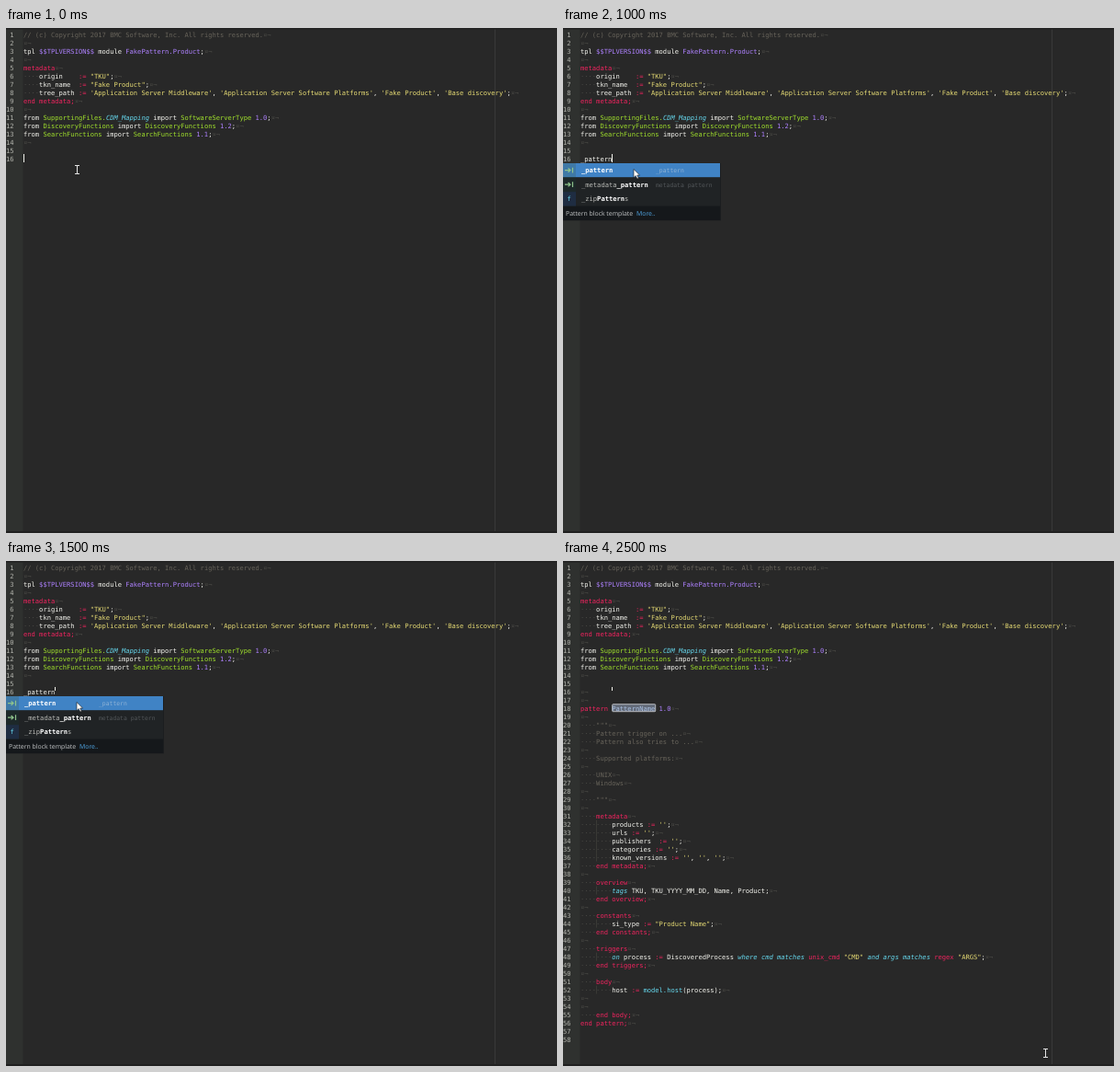
An HTML page that plays this animation: 600x549 px, repeating every 3 s.

```html
<!DOCTYPE html>
<html lang="en">
<head>
<meta charset="utf-8">
<title>Editor snippets</title>
<style>
html, body { margin: 0; width: 100%; height: 100%; overflow: hidden; background: #282828; }
svg { display: block; }
text { font: 7.11px "DejaVu Sans Mono", monospace; white-space: pre; text-rendering: geometricPrecision; fill: #f4f4ee; }
.note { fill: #67635a; }
.str { fill: #e6db74; }
.num { fill: #ae81ff; }
.key { fill: #f0245f; }
.fn { fill: #66d9ef; font-style: italic; }
.call { fill: #66d9ef; }
.lib { fill: #a0e02c; }
.space { fill: #4b4a46; }
.line { fill: #b4b5ae; }
.pick { fill: #a9bfe0; }
.item { fill: #b9bab6; }
.hit { fill: #fff; font-weight: bold; }
.hint { fill: #53575a; font-size: 6.4px; }
.on { fill: #8fb3d6; font-size: 6.4px; }
.info, .more { font: 6.9px "Open Sans", "Noto Sans", sans-serif; fill: #c3c5c6; }
.more { fill: #4fa3e0; }
</style>
</head>
<body>
<svg id="stage" width="600" height="549" viewBox="0 0 600 549"></svg>
<script>
const LEFT = 19, CHAR = 4.28, LINE = 9, ROW = 15.57, POP_TOP = 147, LOOP = 3000;
const stage = document.getElementById('stage');

const header = `// (c) Copyright 2017 BMC Software, Inc. All rights reserved.

tpl $$TPLVERSION$$ module FakePattern.Product;

metadata
    origin    := "TKU";
    tkn_name  := "Fake Product";
    tree_path := 'Application Server Middleware', 'Application Server Software Platforms', 'Fake Product', 'Base discovery';
end metadata;

from SupportingFiles.CDM_Mapping import SoftwareServerType 1.0;
from DiscoveryFunctions import DiscoveryFunctions 1.2;
from SearchFunctions import SearchFunctions 1.1;

`;

const template = `

pattern PatternName 1.0

    """
    Pattern trigger on ...
    Pattern also tries to ...

    Supported platforms:

    UNIX
    Windows

    """

    metadata
        products := '';
        urls := '';
        publishers  := '';
        categories := '';
        known_versions := '', '', '';
    end metadata;

    overview
        tags TKU, TKU_YYYY_MM_DD, Name, Product;
    end overview;

    constants
        si_type := "Product Name";
    end constants;

    triggers
        on process := DiscoveredProcess where cmd matches unix_cmd "CMD" and args matches regex "ARGS";
    end triggers;

    body
        host := model.host(process);


    end body;
end pattern;
`;

const RULES = new RegExp([
  /(?<note>\/\/.*)/,
  /(?<str>'[^']*'|"[^"]*")/,
  /(?<num>\$\$\w+\$\$|FakePattern\.Product|\b\d\.\d)/,
  /(?<key>:=|\bend \w+;|^pattern|^(?:metadata|overview|constants|triggers|body)$|\b(?:unix_cmd|regex)\b)/,
  /(?<fn>CDM_Mapping|\b(?:tags|on|where|cmd|matches|and|args)\b)/,
  /(?<call>model\.host)/,
  /(?<lib>SupportingFiles\.|SoftwareServerType|DiscoveryFunctions|SearchFunctions)/,
  /(?<pick>PatternName)/,
  /(?<plain>[^\s;,]+|[;,])/
].map(r => r.source).join('|'), 'g');

function add(parent, tag, attrs, content) {
  const el = document.createElementNS('http://www.w3.org/2000/svg', tag);
  for (const k in attrs) el.setAttribute(k, attrs[k]);
  if (content !== undefined) el.textContent = content;
  return parent.appendChild(el);
}
const rect = (g, x, y, width, height, fill, more) => add(g, 'rect', { x, y, width, height, fill, ...more });
const label = (g, x, y, cls, str) => add(g, 'text', { x, y, class: cls }, str);
const path = (g, d, more) => add(g, 'path', { d, ...more });
const baseline = n => 9.6 + (n - 1) * LINE;

// One mask digit per half second: 1 shows the group, 0 hides it.
function layer(mask) {
  const g = add(stage, 'g', {});
  const steps = [...mask, mask[0]].map((m, i) => ({ offset: i / mask.length, opacity: +m, easing: 'step-end' }));
  g.animate(steps, { duration: LOOP, iterations: Infinity });
  return g;
}

function lineNumber(g, n) {
  label(g, 8.6, baseline(n), 'line', n).setAttribute('text-anchor', 'end');
}

function codeLine(g, str, n, isDoc) {
  const y = baseline(n), code = str.trimStart(), indent = str.length - code.length;
  const at = col => LEFT + col * CHAR;
  if (indent) label(g, LEFT, y, 'space', '·'.repeat(indent));
  if (indent > 4) rect(g, at(4), y - 7, 0.6, LINE, '#45453f');
  if (isDoc) label(g, at(indent), y, 'note', code);
  else for (const m of code.matchAll(RULES)) {
    const cls = Object.keys(m.groups).find(k => m.groups[k] !== undefined);
    label(g, at(indent + m.index), y, cls, m[0]);
  }
  label(g, at(str.length), y, 'space', '¤¬');
}

function block(g, source, first) {
  let isDoc = false;
  source.split('\n').slice(0, -1).forEach((str, i) => {
    const quotes = str.includes('"""');
    codeLine(g, str, first + i, isDoc || quotes);
    if (quotes) isDoc = !isDoc;
  });
}

function popup(g, width, hintX, rows, info, moreX) {
  const bottom = POP_TOP + rows.length * ROW;
  rect(g, 0, POP_TOP, width + 1, bottom - POP_TOP + 15.6, '#1b1d1f');
  rect(g, 0, POP_TOP, width, bottom - POP_TOP, '#202325');
  rect(g, 0, POP_TOP, 14, bottom - POP_TOP, '#1d2829');
  rows.forEach(([name, hit, hint, kind], i) => {
    const top = POP_TOP + i * ROW, mid = top + 7.6, y = mid + 2.4;
    if (!i) {
      rect(g, 14, top, hintX > 200 ? 527 : width - 14, ROW - 0.4, '#4083c5');
      rect(g, 0, top, 14, ROW - 0.4, '#3f79a6');
    }
    if (kind) {
      rect(g, 0, top, 14, ROW, '#1f2d42');
      label(g, 4.5, y, 'call', kind);
    } else {
      path(g, `M2 ${mid}H8M5.6 ${mid - 2.2}L8 ${mid}L5.6 ${mid + 2.2}M10.5 ${mid - 2.8}V${mid + 2.8}`,
        { fill: 'none', stroke: '#8fc48c', 'stroke-width': 1.2 });
    }
    const at = name.indexOf(hit), end = at + hit.length;
    [[0, at, 'item'], [at, end, 'hit'], [end, name.length, i ? 'item' : 'plain']].forEach(([a, b, cls]) => {
      if (b > a) label(g, 20 + a * CHAR, y, cls, name.slice(a, b));
    });
    label(g, hintX, y, i ? 'hint' : 'on', hint);
  });
  rect(g, 0, bottom, width, 15.2, '#15181b');
  label(g, 3, bottom + 10, 'info', info);
  label(g, moreX, bottom + 10, 'more', 'More..');
}

function beam(mask, x, y) {
  path(layer(mask), `M${x - 2.5} ${y - 4.5}H${x + 2.5}M${x} ${y - 4.5}V${y + 4.5}M${x - 2.5} ${y + 4.5}H${x + 2.5}`,
    { fill: 'none', stroke: '#e4e4e4', 'stroke-width': 1 });
}

rect(stage, 0, 0, 600, 549, '#282828');
rect(stage, 0, 0, 18.5, 549, '#2f312f');
rect(stage, 532, 0, 1, 549, '#393939');
rect(stage, 0, 0, 600, 1.5, '#212121');
rect(stage, 0, 547, 600, 2, '#202020');
block(stage, header, 1);
for (let n = 1; n <= 16; n++) lineNumber(stage, n);

const body = layer('000011');
rect(body, 53.7, 155.7, 47, 8, '#626a78', { stroke: '#c4c7cb', 'stroke-width': 0.9, rx: 0.8 });
block(body, template, 16);
for (let n = 17; n <= 58; n++) lineNumber(body, n);

const caret = (g, x, y, h) => rect(g, x, y, 1, h, '#f2f2ec');
caret(layer('100000'), 19, 137, 9);

const first = layer('010000');
label(first, LEFT, baseline(16), 'plain', '_');
caret(first, 23, 137, 9);
popup(first, 547, 250, [
  ['_Copyright_BMC_Copyright_', '_', '_Copyright BMC Copyright'],
  ['_debug_%node.attrs%_', '_', '_debug %node.attrs%'],
  ['_debug_line_', '_', '_debug line'],
  ['_debug_%variable%_', '_', '_debug %variable%'],
  ['_debug_simple_', '_', '_debug simple'],
  ['_debug_%node.attrs%_Exec_', '_', '_debug %node.attrs% Exec'],
  ['_define_Function_', '_', '_define Function'],
  ['_definitions_Big_', '_', '_definitions Big'],
  ['_db_host_port_SearchFunctions.getSoftwareNodes', '_', 'SearchFunctions.getSoftwareNodes(host, node_address, software_type, port,…'],
  ['_db_host_type_SearchFunctions.getSoftwareNodes', '_', 'SearchFunctions.getSoftwareNodes(host, node_address, software_type, db_na…']
], 'Copyright info', 53);
rect(first, 541, POP_TOP, 6, ROW * 10, '#25282a');
rect(first, 541.5, POP_TOP + 0.5, 5, 24.5, '#4b4f52');

const second = layer('001100');
label(second, LEFT, baseline(16), 'plain', '_pattern');
popup(second, 171, 101, [
  ['_pattern', '_pattern', '_pattern'],
  ['_metadata_pattern', '_pattern', 'metadata pattern'],
  ['_zipPatterns', 'Pattern', '', 'f']
], 'Pattern block template', 80);
caret(layer('001111'), 53, 137, 4);
caret(layer('001000'), 53, 141, 5);

beam('100010', 77.5, 154);
path(layer('011100'), 'M77 153.5V162.6L79.2 160.6L80.8 164L82.3 163.3L80.8 160H83.6Z',
  { fill: '#fff', stroke: '#111', 'stroke-width': 0.6 });
beam('000001', 525.5, 535);
</script>
</body>
</html>
```
